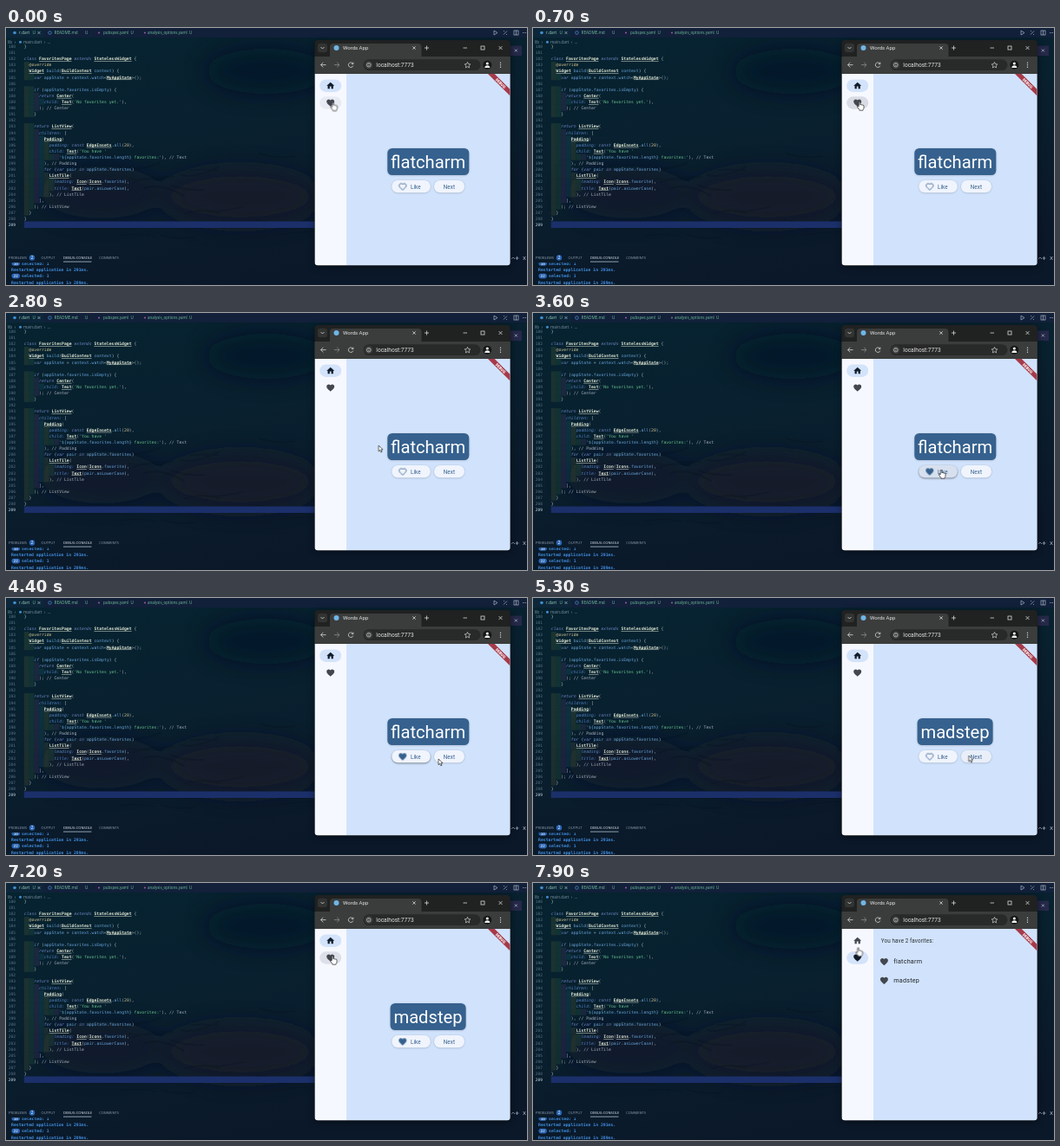
An HTML page for the animation above (8 s loop, 600 px wide and 297 px high).

```html
<!DOCTYPE html>
<html lang="en">
<head>
<meta charset="utf-8">
<title>Editor and app preview</title>
<style>
html, body { margin: 0; width: 100%; height: 100%; overflow: hidden; background: #0a1b2a; }
svg { display: block; width: 600px; height: 297px; }
text { white-space: pre; font-family: Roboto, sans-serif; }
.mono text { font: 4.79px "DejaVu Sans Mono", monospace; }
.ui text { font: 4.7px "Open Sans", sans-serif; }
.ui .heads text { font-size: 4.05px; }
.ui .small { font-size: 4.5px; }
.kw { fill: #6f86c4; font-style: italic; }
.type { fill: #e2ead6; font-weight: bold; text-decoration: underline; }
.prop { fill: #5584c4; font-style: italic; }
.str { fill: #66c08c; }
.num { fill: #d6c690; }
.id { fill: #68a2d6; }
.sym { fill: #aab8bc; }
.note { fill: #a9b1bd; }
.body { font-size: 6.3px; letter-spacing: .11px; fill: #2c3036; }
.tile { font-size: 7.2px; letter-spacing: .22px; fill: #1f2227; }
.label { font-size: 6.3px; letter-spacing: .08px; fill: #36618e; }
.word { font-size: 20.2px; fill: #fff; text-anchor: middle; }
.mid { text-anchor: middle; }

/* One loop is 8 s, so 1.25% is 100 ms. */
.s { animation: 8s step-end infinite; }
.l { animation: 8s linear infinite; }
@keyframes home { 0%, 26.25% { opacity: 1 } 10%, 91.25% { opacity: 0 } }
@keyframes empty { 0%, 26.25% { opacity: 0 } 10% { opacity: 1 } }
@keyframes list { 0% { opacity: 0 } 91.25% { opacity: 1 } }
@keyframes first { 0% { opacity: 1 } 61.25% { opacity: 0 } }
@keyframes second { 0% { opacity: 0 } 61.25% { opacity: 1 } }
@keyframes liked { 0%, 61.25% { opacity: 0 } 43.75%, 76.25% { opacity: 1 } }
@keyframes unliked { 0%, 61.25% { opacity: 1 } 43.75%, 76.25% { opacity: 0 } }
@keyframes pillHome {
  0%, 10%, 28.75%, 91.25% { opacity: 1; transform: scaleX(1) }
  11.25%, 26.25%, 92.5%, 100% { opacity: 0; transform: scaleX(.5) }
}
@keyframes pillHeart {
  0%, 10%, 28.75%, 91.25% { opacity: 0; transform: scaleX(.5) }
  12.5%, 26.25%, 93.75%, 100% { opacity: 1; transform: scaleX(1) }
}
@keyframes inkHome { 0%, 10%, 26.25%, 91.25% { fill: #101c2b } 10.01%, 26.24%, 91.26%, 100% { fill: #43474e } }
@keyframes inkHeart { 0%, 10%, 26.25%, 91.25% { fill: #43474e } 10.01%, 26.24%, 91.26%, 100% { fill: #101c2b } }
@keyframes hoverHeart {
  0% { opacity: .06 } 7.5%, 10% { opacity: .13 } 13.75%, 86.25% { opacity: 0 }
  87.5% { opacity: .06 } 91.25% { opacity: .13 } 95%, 100% { opacity: 0 }
}
@keyframes hoverHome {
  0%, 18.75% { opacity: 0 } 20%, 25% { opacity: .03 } 26.25% { opacity: .1 } 30%, 100% { opacity: 0 }
}
@keyframes hoverLike {
  0%, 38.75% { opacity: 0 } 40%, 43% { opacity: .06 } 45% { opacity: .13 }
  50%, 71.25% { opacity: 0 } 72.5%, 75% { opacity: .06 } 77.5%, 79% { opacity: .13 } 83.75%, 100% { opacity: 0 }
}
@keyframes liftLike {
  0%, 38.75%, 56.25%, 71.25%, 83.75%, 100% { opacity: 0 }
  40%, 55%, 72.5%, 82.5% { opacity: 1 }
}
@keyframes hoverNext {
  0%, 55% { opacity: 0 } 57.5%, 60% { opacity: .06 } 62.5% { opacity: .13 } 67.5%, 100% { opacity: 0 }
}
@keyframes sparkle {
  0%, 76.25% { opacity: 0 } 77.5%, 79.5% { opacity: .6 } 83%, 100% { opacity: 0 }
}
@keyframes travel {
  0% { transform: translate(376.5px, 85.5px) }
  8.75%, 13.75% { transform: translate(376px, 85px) }
  20%, 27.5% { transform: translate(377.2px, 66.5px) }
  35% { transform: translate(429px, 153px) }
  40%, 46.25% { transform: translate(470px, 181px) }
  55% { transform: translate(498px, 186px) }
  57.5%, 65% { transform: translate(508px, 183px) }
  72.5%, 81.25% { transform: translate(471px, 178.5px) }
  87.5%, 95% { transform: translate(376px, 84px) }
  98.75%, 100% { transform: translate(374.5px, 74.5px) }
}
@keyframes hand {
  0%, 40%, 56.25%, 71.25%, 86.25% { opacity: 1 }
  28.75%, 47.5%, 66.25%, 82.5% { opacity: 0 }
}
@keyframes arrow {
  0%, 40%, 56.25%, 71.25%, 86.25% { opacity: 0 }
  28.75%, 47.5%, 66.25%, 82.5% { opacity: 1 }
}
.pill { transform-box: fill-box; transform-origin: center; }
</style>
</head>
<body>
<svg viewBox="0 0 600 297">
  <defs>
    <linearGradient id="sky" x2=".4" y2="1">
      <stop offset="0" stop-color="#062330"/>
      <stop offset=".5" stop-color="#09202f"/>
      <stop offset="1" stop-color="#0b1829"/>
    </linearGradient>
    <filter id="soft" x="-50%" y="-50%" width="200%" height="200%"><feGaussianBlur stdDeviation="12"/></filter>
    <filter id="shade" x="-20%" y="-40%" width="140%" height="180%"><feGaussianBlur stdDeviation=".8"/></filter>
    <filter id="drop" x="-10%" y="-10%" width="120%" height="120%"><feGaussianBlur stdDeviation="4"/></filter>
    <path id="heart" d="M12 21.35l-1.45-1.32C5.4 15.36 2 12.28 2 8.5 2 5.42 4.42 3 7.5 3c1.74 0 3.41.81 4.5 2.09C13.09 3.81 14.76 3 16.5 3 19.58 3 22 5.42 22 8.5c0 3.78-3.4 6.86-8.55 11.54z"/>
    <path id="house" d="M10 20v-6h4v6h5v-8h3L12 3 2 12h3v8z"/>
    <clipPath id="page"><path d="M355.7 53H580.6V271q0 3.300-3.300 3.300H359q-3.300 0-3.300-3.300z"/></clipPath>
    <clipPath id="output"><rect y="271.300" width="356" height="26"/></clipPath>
  </defs>

  <!-- Editor -->
  <rect width="600" height="297" fill="url(#sky)"/>
  <g filter="url(#soft)">
    <ellipse cx="270" cy="195" rx="90" ry="32" fill="#1c1e2c" opacity=".7"/>
    <ellipse cx="300" cy="50" rx="70" ry="26" fill="#0a1626" opacity=".6"/>
    <ellipse cx="110" cy="190" rx="70" ry="30" fill="#121c2b" opacity=".5"/>
  </g>
  <g id="branches" fill="none" stroke="#07131f" opacity=".3"/>
  <rect width="600" height="11" fill="#12203a"/>
  <rect width="44" height="11" fill="#0d2639"/>
  <rect x="20.800" y="223.500" width="560" height="7.500" fill="#1b2f6a"/>
  <rect x="580" y="20.500" width="14" height="11.500" fill="#26294a"/>
  <path d="M585.800 24.500l3 3m0-3l-3 3" stroke="#c3c9da" stroke-width=".7"/>

  <g class="ui">
    <g fill="#72c29c">
      <text x="15" y="7.300" fill="#9fd8c0">r.dart</text><text x="30.500" y="7.300">U</text>
      <g style="font-style:italic"><text x="55.500" y="7.300">README.md</text><text x="91" y="7.300">U</text></g>
      <text class="small" x="112" y="7.300">pubspec.yaml  U</text>
      <text class="small" x="163" y="7.300">analysis_options.yaml  U</text>
    </g>
    <circle cx="10" cy="5.500" r="1.800" fill="#3f8fd0"/>
    <circle cx="50.500" cy="5.500" r="1.800" fill="none" stroke="#4a96dc" stroke-width=".7"/>
    <g fill="#a05aa8"><circle cx="107" cy="5.500" r="1"/><circle cx="160" cy="5.500" r="1"/></g>
    <text x="2" y="17.700" fill="#8294a4">lib  ›</text>
    <circle cx="16.500" cy="16.200" r="1.500" fill="#3f8fd0"/>
    <text x="20" y="17.700" fill="#8294a4">main.dart  ›  ...</text>
    <g fill="none" stroke="#a9b7cc" stroke-width=".7">
      <path d="M36.500 4l3 3m0-3l-3 3"/>
      <path d="M562 3l4 2.500-4 2.500zM573 7.500l4-4m-4 0h1m2 4h1"/>
      <rect x="585" y="3" width="5" height="5"/><path d="M587.500 3v5"/>
      <path d="M595 5.500h.7m1 0h.7m1 0h.7" stroke-width="1"/>
      <path d="M582 267l2-2 2 2M588.500 264v4m-2-2h4M595.500 264l3 4m0-4l-3 4"/>
    </g>
    <g class="heads" fill="#94a2b2">
      <text x="3" y="267">PROBLEMS</text>
      <text x="40.500" y="267">OUTPUT</text>
      <text x="66" y="267" fill="#eef3fa">DEBUG CONSOLE</text>
      <text x="107.300" y="267">COMMENTS</text>
    </g>
    <circle cx="30" cy="265.500" r="3.200" fill="#2a66b4"/>
    <text x="30" y="267.100" class="mid" fill="#fff">2</text>
    <rect x="66" y="269.700" width="32.500" height=".7" fill="#cfdcec"/>
  </g>
  <g class="mono">
    <g id="code"></g>
    <g id="console" clip-path="url(#output)"></g>
  </g>

  <!-- Browser -->
  <rect x="356" y="16" width="225" height="259" rx="4" fill="#000" opacity=".5" filter="url(#drop)"/>
  <rect x="355.500" y="14" width="225.300" height="260.500" rx="4" fill="#202121"/>
  <rect x="359" y="17.800" width="11" height="10.500" rx="3" fill="#323333"/>
  <path d="M373 33v-11q0-4 4-4h97.500q4 0 4 4v11z" fill="#3b3c3c"/>
  <rect x="355.500" y="33" width="225.300" height="20" fill="#3b3c3c"/>
  <circle cx="380.500" cy="23" r="3" fill="#6fb6e6"/>
  <text x="388" y="25.100" fill="#e6e6e6" font-size="6">Words App</text>
  <g fill="none" stroke="#d5d6d6" stroke-width=".8">
    <path d="M362.500 22l2 2 2-2M468.300 21.300l3.400 3.400m0-3.400l-3.400 3.400M482 23h5m-2.500-2.500v5"/>
    <path d="M526.500 23h4.500M567.500 21l4 4m0-4l-4 4"/>
    <rect x="547" y="21" width="4" height="4"/>
    <path d="M368.500 42.600h-6m2.800-2.800l-2.800 2.800 2.800 2.800"/>
    <path d="M378 42.600h6m-2.800-2.800l2.800 2.800-2.800 2.800" stroke="#8b8c8c"/>
    <path d="M399.600 41.300a2.800 2.800 0 1 0 .2 2.300M399.900 39.600v2h-2.100"/>
  </g>
  <rect x="411.500" y="36.300" width="135" height="12.800" rx="6.400" fill="#282929"/>
  <circle cx="417.800" cy="42.700" r="4.600" fill="#3b3c3c"/>
  <g fill="none" stroke="#d5d6d6" stroke-width=".7">
    <circle cx="417.800" cy="42.700" r="2.300"/><path d="M417.800 42.500v1.400m0-2.600v.6"/>
    <path d="M531.500 39.400l1 2.200 2.400.3-1.800 1.600.5 2.400-2.100-1.200-2.100 1.200.5-2.400-1.800-1.600 2.400-.3z"/>
  </g>
  <text x="426.300" y="45" fill="#e0e1e1" font-size="6.600">localhost:7773</text>
  <circle cx="554.300" cy="42.700" r="5" fill="#151617"/>
  <circle cx="554.300" cy="41" r="1.600" fill="#eee"/>
  <path d="M551.300 45.900q0-2.600 3-2.600t3 2.600z" fill="#eee"/>
  <g fill="#d5d6d6"><circle cx="569.500" cy="40.200" r=".7"/><circle cx="569.500" cy="42.700" r=".7"/><circle cx="569.500" cy="45.200" r=".7"/></g>

  <!-- App -->
  <g clip-path="url(#page)">
    <rect x="355" y="53" width="37" height="222" fill="#f6f8ff"/>
    <rect x="392" y="53" width="189" height="222" fill="#d1e3fc"/>
    <rect class="pill l" style="animation-name:pillHome" x="361.200" y="59.500" width="25" height="14.400" rx="7.200" fill="#d3e3fa"/>
    <rect class="pill l" style="animation-name:pillHeart" x="361.200" y="79.300" width="25" height="14.400" rx="7.200" fill="#d3e3fa"/>
    <rect class="l" style="animation-name:hoverHome" x="361.200" y="59.500" width="25" height="14.400" rx="7.200" fill="#1a2030"/>
    <rect class="l" style="animation-name:hoverHeart" x="361.200" y="79.300" width="25" height="14.400" rx="7.200" fill="#1a2030"/>
    <g transform="translate(368.300 61.300) scale(.45)"><use href="#house" class="l" style="animation-name:inkHome"/></g>
    <g transform="translate(368.300 81.100) scale(.45)"><use href="#heart" class="l" style="animation-name:inkHeart"/></g>

    <g class="s" style="animation-name:home">
      <g class="s" style="animation-name:first">
        <rect x="439.300" y="139.500" width="94" height="31" rx="5.500" opacity=".22" filter="url(#shade)"/>
        <rect x="439.300" y="139" width="94" height="31" rx="5.500" fill="#36618e"/>
        <text class="word" x="486.100" y="161.500">flatcharm</text>
      </g>
      <g class="s" style="animation-name:second">
        <rect x="442.600" y="139.500" width="87" height="31" rx="5.500" opacity=".22" filter="url(#shade)"/>
        <rect x="442.600" y="139" width="87" height="31" rx="5.500" fill="#36618e"/>
        <text class="word" x="486" y="161.500">madstep</text>
      </g>
      <rect x="444.300" y="176.500" width="44.500" height="14.300" rx="7.100" opacity=".22" filter="url(#shade)"/>
      <rect class="l" style="animation-name:liftLike" x="444.300" y="177.200" width="44.500" height="14.300" rx="7.100" fill-opacity=".28" filter="url(#shade)"/>
      <rect x="444.300" y="176" width="44.500" height="14.300" rx="7.100" fill="#f0f4fd"/>
      <rect x="493" y="176.500" width="35" height="14.300" rx="7.100" opacity=".22" filter="url(#shade)"/>
      <rect x="493" y="176" width="35" height="14.300" rx="7.100" fill="#f0f4fd"/>
      <rect class="l" style="animation-name:hoverNext" x="493" y="176" width="35" height="14.300" rx="7.100" fill="#36618e"/>
      <g transform="translate(451.400 178) scale(.45)">
        <g class="s" style="animation-name:unliked">
          <use href="#heart" transform="translate(1.200 1.200) scale(.9)" fill="none" stroke="#36618e" stroke-width="2.200"/>
        </g>
        <use href="#heart" class="s" style="animation-name:liked" fill="#36618e"/>
      </g>
      <text class="label" x="466" y="185.700">Like</text>
      <text class="label" x="503.700" y="185.700">Next</text>
      <rect class="l" style="animation-name:hoverLike" x="444.300" y="176" width="44.500" height="14.300" rx="7.100" fill="#36618e"/>
      <g id="dots" class="l" style="animation-name:sparkle" fill="#fff"></g>
    </g>

    <text class="body mid s" style="animation-name:empty" x="486" y="166.300">No favorites yet.</text>

    <g class="s" style="animation-name:list">
      <text class="body" x="400.800" y="69.200">You have 2 favorites:</text>
      <use href="#heart" transform="translate(399 85.700) scale(.45)" fill="#43474e"/>
      <text class="tile" x="415.300" y="93.400">flatcharm</text>
      <use href="#heart" transform="translate(399 107.500) scale(.45)" fill="#43474e"/>
      <text class="tile" x="415.300" y="115.200">madstep</text>
    </g>

    <path d="M555 53h7.700L580.600 70.900v7.700z" fill="#a63a49"/>
    <text transform="translate(569.700 63.900) rotate(45)" y="1.600" class="mid" fill="#fff" font-size="4.500" font-weight="900">DEBUG</text>
  </g>

  <g class="l" style="animation-name:travel">
    <path class="s" style="animation-name:arrow" d="M0 0v6.800l1.600-1.500 1.100 2.500 1.200-.5-1.100-2.500h2.200z" fill="#fff" stroke="#000" stroke-width=".6"/>
    <path class="s" style="animation-name:hand" d="M-.8.800q.8-1.400 1.600 0v3q.9-.7 1.500.1.900-.5 1.400.3 1.300-.3 1.300 1v2q0 1.200-.9 2.300v.7h-4.200v-.7l-2.700-3.700q.2-1.300 2 0z" fill="#fff" stroke="#000" stroke-width=".6"/>
  </g>
</svg>
<script>
const $ = id => document.getElementById(id);
const esc = s => s.replace(/&/g, "&amp;").replace(/</g, "&lt;");
const source = `}

class FavoritesPage extends StatelessWidget {
  @override
  Widget build(BuildContext context) {
    var appState = context.watch<MyAppState>();

    if (appState.favorites.isEmpty) {
      return Center(
        child: Text('No favorites yet.'),
      ); // Center
    }

    return ListView(
      children: [
        Padding(
          padding: const EdgeInsets.all(20),
          child: Text('You have '
              '\${appState.favorites.length} favorites:'), // Text
        ), // Padding
        for (var pair in appState.favorites)
          ListTile(
            leading: Icon(Icons.favorite),
            title: Text(pair.asLowerCase),
          ), // ListTile
      ],
    ); // ListView
  }
}
`.split("\n");

const token = /(?<note>\/\/.*)|(?<id>\$\{[^}]*\})|(?<str>'[^'$]*'?|(?<=\} )\w+:')|(?<kw>\b(?:class|extends|var|if|return|const|for|in)\b)|(?<type>\b[A-Z]\w*)|(?<prop>\w+:)|(?<num>@\w+|\d+)|(?<name>\w+)|(?<sym>[^\w\s]|\s+)/g;
const paint = line => [...line.matchAll(token)].map(m => {
  const kind = Object.keys(m.groups).find(k => m.groups[k] !== undefined);
  return `<tspan class="${kind === "name" ? "id" : kind}">${esc(m[0])}</tspan>`;
}).join("");

// Editor rows with rainbow indent guides
const tints = ["#ffff40", "#7fff7f", "#ff7fff", "#4fecec"];
const left = 20.8, em = 2.884, pitch = 7.111;
$("code").innerHTML = source.map((line, i) => {
  const y = 21.2 + i * pitch;
  const depth = line.search(/\S/);
  let out = "";
  for (let d = 0; d * 2 < depth; d++)
    out += `<rect x="${left + d * 2 * em}" y="${y - 3.6}" width="${2 * em}" height="${pitch}" fill="${tints[d % 4]}" opacity=".08"/>`;
  const active = i === source.length - 1;
  out += `<text x="11" y="${y + 1.8}" text-anchor="end" fill="${active ? "#c5d8e4" : "#587486"}" style="font-size:4.6px">${180 + i}</text>`;
  if (depth >= 0)
    out += `<text x="${left + depth * em}" y="${y + 1.8}">${paint(line.trim())}</text>`;
  return out;
}).join("");

// Debug console
const log = ["selected: 1", "Restarted application in 291ms.", "selected: 1", "Restarted application in 289ms."];
$("console").innerHTML = log.map((line, i) => {
  const y = 272 + i * 7.3, badge = line[0] === "s";
  const mark = badge ? `<rect x="6.5" y="${y - 2.8}" width="9.5" height="5.6" rx="2.8" fill="#2a66b4"/>
    <text x="11.2" y="${y + 1.5}" class="mid" fill="#fff" style="font-size:4.2px">${i ? 22 : 10}</text>` : "";
  return mark + `<text x="${badge ? 18 : 6}" y="${y + 1.7}" fill="#4290e2" style="font-weight:bold">${line}</text>`;
}).join("");

let seed = 7;
const rnd = () => (seed = seed * 16807 % 2147483647) / 2147483647;
const repeat = (n, make) => Array.from({ length: n }, make).join("");

$("branches").innerHTML = repeat(14, () => {
  const x = 130 + rnd() * 200, y = 130 + rnd() * 120;
  return `<path d="M${x} ${y}q${12 + rnd() * 15} ${rnd() * 16 - 8} ${28 + rnd() * 20} ${rnd() * 24 - 12}" stroke-width="${.5 + rnd() * 1.5}"/>`;
});
$("dots").innerHTML = repeat(110, () =>
  `<circle cx="${449 + rnd() * 36}" cy="${177.5 + rnd() * 11.5}" r=".45"/>`);
</script>
</body>
</html>
```
